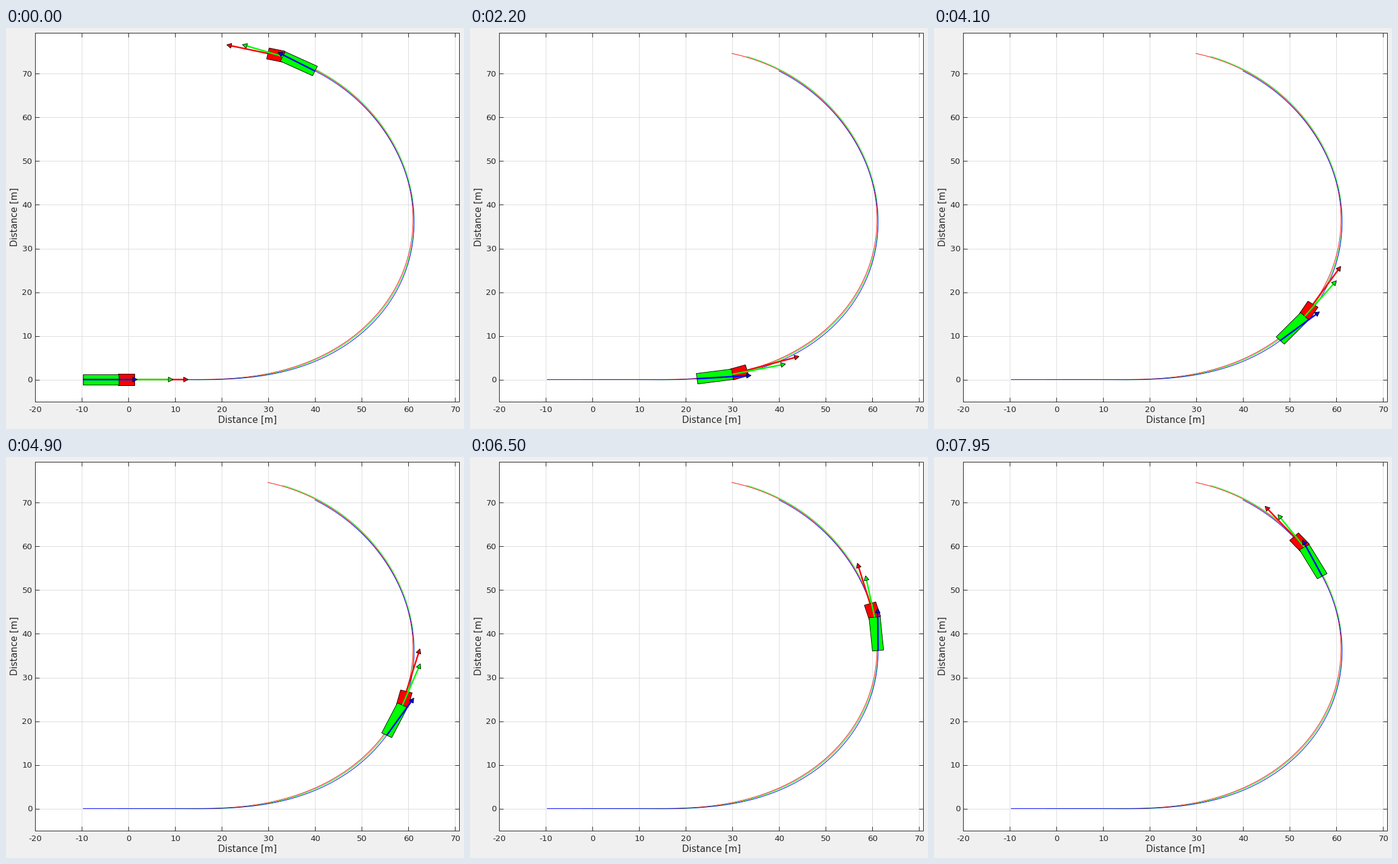
Write a matplotlib script that moves like this. It is 756 px wide and 661 px high and loops after 8000 ms.

```python
import numpy as np
import matplotlib.pyplot as plt
from matplotlib.animation import FuncAnimation
from matplotlib.patches import Polygon
from matplotlib.transforms import Affine2D

W, H = 756, 661
FRAMES, STEP_MS = 160, 50
LEFT, RIGHT, TOP, BOTTOM = 48, 748, 8, 616
SCALE = np.array([7.705, 7.212])          # pixels per metre
TRACTOR, TRAILER = 3.27, 7.65             # front to hitch, hitch to rear
ARROW_TIME = 0.775                        # arrow metres per m/s
RED, GREEN, BLUE, INK = "#ff0000", "#00ff00", "#0000ff", "#262626"

plt.rcParams["font.family"] = "DejaVu Sans"


def smoothstep(x):
    x = np.clip(x, 0, 1)
    return x * x * (3 - 2 * x)


def unit(angle):
    return np.stack([np.cos(angle), np.sin(angle)], axis=-1)


def integrate(rate):
    steps = (rate[1:] + rate[:-1]) / 2 * DT
    return np.concatenate([np.zeros_like(rate[:1]), np.cumsum(steps, axis=0)])


# The tractor steers into a left turn, loses speed, then eases the turn a little
PER_FRAME = 10
DT = STEP_MS / 1000 / PER_FRAME
time = np.arange(200 * PER_FRAME + 1) * DT
speed = 11.17 + 3.75 * np.exp(-np.maximum(0, time - 2.35) / 3.7)
turn = np.radians(22.9 * (1 - np.exp(-np.maximum(0, time - 0.75) / 0.9))
                  - 5.95 * smoothstep((time - 4.2) / 3.6))
course = integrate(turn)
front = np.array([1.17, 0]) + integrate(speed[:, None] * unit(course))

# Tyre slip grows with the cube of lateral acceleration and builds up with a lag
slip_goal = np.radians(8.6) * (speed * turn / 5.2) ** 3
slip = np.zeros_like(time)
trailer_angle = np.zeros_like(time)
hitch_course = course - TRACTOR * turn / speed
for i in range(len(time) - 1):
    slip[i + 1] = slip[i] + (slip_goal[i] - slip[i]) * DT / 0.5
    swing = np.sin(hitch_course[i] - trailer_angle[i]) + slip[i]
    trailer_angle[i + 1] = trailer_angle[i] + speed[i] * swing / TRAILER * DT

tractor_dir = unit(course + 0.2 * slip)
hitch = front - TRACTOR * tractor_dir
rear = hitch - TRAILER * unit(trailer_angle)
tracks = [(front, RED), (hitch, GREEN), (rear, BLUE)]
speeds = [np.gradient(p, time, axis=0) for p, _ in tracks]

fig = plt.figure(figsize=(W / 72, H / 72), dpi=72, facecolor="#f0f0f0")
ax = fig.add_axes([LEFT / W, 1 - BOTTOM / H,
                   (RIGHT - LEFT) / W, (BOTTOM - TOP) / H])
ax.set_xlim(-20, -20 + (RIGHT - LEFT) / SCALE[0])
ax.set_ylim(-5, -5 + (BOTTOM - TOP) / SCALE[1])
ax.set_xticks(range(-20, 71, 10))
ax.set_yticks(range(0, 71, 10))
ax.tick_params(direction="in", length=7, width=1, color=INK, top=True,
               right=True, labelbottom=False, labelleft=False)
ax.set_axisbelow(True)
ax.grid(color="#dedede", linewidth=1)
for spine in ax.spines.values():
    spine.set(color=INK, linewidth=1)

# grid lines snap to pixel centres, so drawn data moves half a pixel too
place = ax.transData + Affine2D().translate(0.5, 0.5)


def label(x, y, text, size=13.33, **kw):
    kw = {"ha": "center", "va": "baseline", **kw}
    fig.text(x / W, 1 - y / H, text, fontsize=size, color=INK, **kw)


for v in range(-20, 71, 10):
    label(LEFT + 0.5 + (v + 20) * SCALE[0], 633, str(v))
for v in range(0, 71, 10):
    label(43.5, BOTTOM - (v + 5) * SCALE[1] + 4.5, str(v), ha="right")
label(399, 651, "Distance [m]", 15)
label(19, 311.5, "Distance [m]", 15, rotation=90, rotation_mode="anchor")

for points, color in tracks:
    ax.plot(*points.T, color=color, linewidth=0.9, zorder=2, transform=place)


def box(tail, nose, half):
    along = (nose - tail) / np.hypot(*(nose - tail))
    side = half * np.array([-along[1], along[0]])
    return np.array([tail + side, nose + side, nose - side, tail - side])


class Rig:
    def __init__(self, z):
        self.tractor = self.patch(RED, z)
        self.trailer = self.patch(GREEN, z + 0.1)
        self.arrows = []
        for n, (_, color) in enumerate(tracks):
            layer = z + 0.2 + n / 10
            shaft, = ax.plot([], [], color=color, linewidth=2.5, zorder=layer,
                             solid_capstyle="butt", transform=place)
            self.arrows.append((shaft, self.patch(color, layer + 0.05)))

    def patch(self, color, z):
        return ax.add_patch(Polygon(np.zeros((3, 2)), facecolor=color,
                                    edgecolor="black", linewidth=0.9,
                                    joinstyle="miter", zorder=z,
                                    transform=place))

    def pose(self, k):
        back = hitch[k] - 0.2 * tractor_dir[k]
        self.tractor.set_xy(box(back, front[k], 1.28))
        self.trailer.set_xy(box(rear[k], hitch[k], 1.2))
        for (points, _), vel, (shaft, head) in zip(tracks, speeds, self.arrows):
            start = points[k]
            tip = start + ARROW_TIME * vel[k]
            d = (tip - start) * SCALE
            d /= np.hypot(*d)
            side = 4 * np.array([-d[1], d[0]]) / SCALE
            neck = tip - 7.5 * d / SCALE
            shaft.set_data(*np.array([start, neck]).T)
            head.set_xy([tip, neck + side, neck - side])

    def show(self, on):
        for art in (self.tractor, self.trailer, *sum(self.arrows, ())):
            art.set_visible(on)


goal, rig = Rig(3), Rig(4)
goal.pose(len(time) - 1)


def draw(frame):
    # the rig stands still for one frame while the goal pose is shown
    goal.show(frame == 0)
    rig.pose(PER_FRAME * max(0, frame - 1))
    return []


anim = FuncAnimation(fig, draw, frames=FRAMES, interval=STEP_MS,
                     repeat=True, repeat_delay=0, blit=False)
plt.show()
```
